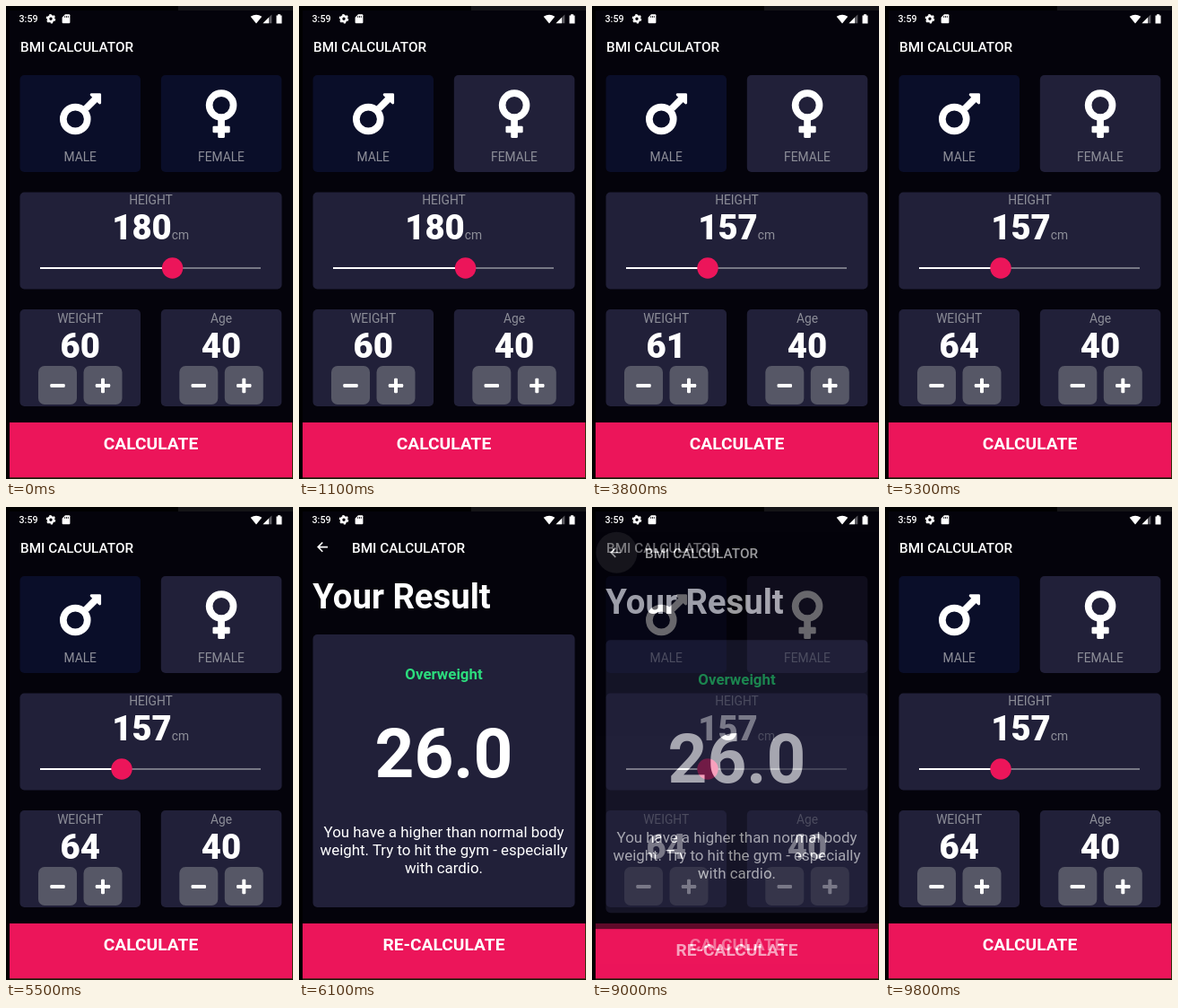
An HTML page that plays this animation: 320x527 px, repeating every 9900 ms.

```html
<!DOCTYPE html>
<html lang="en">
<head>
<meta charset="utf-8">
<title>BMI calculator</title>
<style>
  html, body { margin: 0; width: 100%; height: 100%; overflow: hidden; background: #000; }
  svg { display: block; width: 320px; height: 527px; font-family: Roboto, sans-serif; }
</style>
</head>
<body>
<svg id="stage" viewBox="0 0 320 527">
  <defs>
    <clipPath id="screen"><rect x="4" width="315" height="525.5"/></clipPath>
    <g id="minus"><rect x="-8.2" y="-2" width="16.4" height="4" rx="1.2"/></g>
    <g id="plus"><use href="#minus"/><rect x="-2" y="-8.2" width="4" height="16.4" rx="1.2"/></g>
  </defs>
  <rect width="320" height="527"/>
  <rect x="192" width="128" height="5" fill="#141417"/>
  <rect x="4" y="5" width="316" height="521.5" fill="#04030b"/>
  <g clip-path="url(#screen)">
    <g id="home"></g>
    <g id="result"></g>
  </g>
  <path d="M4 526H319.5V464" fill="none" stroke="#33300c"/>
  <g id="status" fill="#fff">
    <text x="14.5" y="18.3" font-size="10.7" font-weight="500">3:59</text>
    <circle cx="50" cy="14.3" r="3" fill="none" stroke="#fff" stroke-width="2.6"/>
    <circle cx="50" cy="14.3" r="4.6" fill="none" stroke="#fff" stroke-width="1.4" stroke-dasharray="2.4 2.417"/>
    <path d="M66 9.3h4.4q1 0 1 1v8q0 1-1 1h-6.8q-1 0-1-1v-5.600z"/>
    <path d="M65.700 11v2M67.500 11v2M69.300 11v2" stroke="#04030b" stroke-width=".8"/>
    <path d="M272.700 11.800Q279 7.600 285.300 11.800L279 19.500z"/>
    <path d="M296.300 9.500V19.300H286.500z" opacity=".35"/>
    <path d="M293 12.800V19.300H286.500z"/>
    <path d="M303 9.200h3v1.200h1.500v9h-6v-9h1.500z"/>
  </g>
</svg>
<script>
const LOOP = 9900, STEP = 100;
const PINK = '#ec155a', CARD = '#212039', DARK = '#0a0e29', GREY = '#8d8e98', PAGE = '#04030b';
const MID = 161.5;
const $ = id => document.getElementById(id);

function add(parent, tag, attrs, content) {
  const el = document.createElementNS('http://www.w3.org/2000/svg', tag);
  for (const k in attrs) el.setAttribute(k, attrs[k]);
  if (content) el.textContent = content;
  return parent.appendChild(el);
}
const rect = (p, x, y, width, height, fill, rx = 0) =>
  add(p, 'rect', { x, y, width, height, fill, rx });
const label = (p, str, x, y, size, weight = 400, fill = '#fff', anchor = 'middle') =>
  add(p, 'text', { x, y, 'font-size': size, 'font-weight': weight, fill, 'text-anchor': anchor }, str);

function bottomBar(p, str) {
  rect(p, 4, 464, 316, 63, PINK);
  label(p, str, MID, 494.3, 19.2, 700);
}

function counter(p, x, name, value) {
  rect(p, x, 338, 134.5, 108, CARD, 5);
  label(p, name, x + 67.2, 353.3, 13.8, 400, GREY);
  const num = label(p, value, x + 67.2, 391.7, 38.3, 900);
  [['minus', 42], ['plus', 92.5]].forEach(([icon, dx]) => {
    rect(p, x + dx - 21.5, 401, 43, 43, '#565766', 7);
    add(p, 'use', { href: '#' + icon, x: x + dx, y: 423, fill: '#fff' });
  });
  return num;
}

function buildHome(p) {
  label(p, 'BMI CALCULATOR', 16, 50.5, 15.3, 500, '#fff', 'start');
  rect(p, 15.5, 77, 134.5, 108, DARK, 5);
  const female = rect(p, 172.8, 77, 134.5, 108, DARK, 5);
  label(p, 'MALE', 82.7, 172.8, 13.8, 400, GREY);
  label(p, 'FEMALE', 240, 172.8, 13.8, 400, GREY);

  const glyph = x => add(p, 'g', {
    transform: `translate(${x} 89.5) scale(.12)`, fill: '#fff', stroke: '#fff', 'stroke-width': 0
  });
  const ring = (g, cy) => add(g, 'circle', { cx: 144, cy, r: 112, fill: 'none', 'stroke-width': 64 });
  const mars = glyph(60), venus = glyph(222.8);
  ring(mars, 304);
  add(mars, 'path', { d: 'M243 205L330 118', 'stroke-width': 64 });
  add(mars, 'path', { d: 'M372 64H293c-11 0-16 13-8.500 20.400l79 79c7.600 7.600 20.400 2.200 20.400-8.500V76q0-12-12-12z' });
  ring(venus, 176);
  rect(venus, 112, 300, 64, 180, '#fff', 12);
  rect(venus, 64, 368, 160, 64, '#fff', 12);

  rect(p, 15.5, 207.5, 292, 108, CARD, 5);
  label(p, 'HEIGHT', MID, 221.2, 13.8, 400, GREY);
  const height = label(p, '180', 118.2, 260, 38.3, 900, '#fff', 'start');
  label(p, 'cm', 184.8, 260, 13.8, 400, GREY, 'start');
  rect(p, 38, 291.2, 246, 1.6, GREY);
  const track = rect(p, 38, 291, 0, 2, '#fff');
  const halo = add(p, 'circle', { cy: 292, fill: PINK, opacity: .16 });
  const thumb = add(p, 'circle', { cy: 292, r: 11.7, fill: PINK });

  const weight = counter(p, 15.5, 'WEIGHT', '60');
  counter(p, 172.8, 'Age', '40');
  bottomBar(p, 'CALCULATE');
  return { female, height, track, halo, thumb, weight };
}

function buildResult(p) {
  rect(p, 4, 22, 316, 505, PAGE);
  const ripple = add(p, 'circle', { cx: 27.5, cy: 44.5, r: 23, fill: '#fff', opacity: 0 });
  add(p, 'path', {
    d: 'M32 44.600H21.500M26.300 39.500L21.200 44.600L26.300 49.700',
    fill: 'none', stroke: '#fff', 'stroke-width': 1.6
  });
  label(p, 'BMI CALCULATOR', 59, 50.5, 15.3, 500, '#fff', 'start');
  label(p, 'Your Result', 15.3, 112.7, 38.3, 700, '#fff', 'start');
  rect(p, 15.5, 142, 292, 304, CARD, 5);
  label(p, 'Overweight', MID, 192, 16.9, 700, '#2cdc7d');
  label(p, '26.0', MID, 301.3, 76.6, 700);
  ['You have a higher than normal body',
   'weight. Try to hit the gym - especially',
   'with cardio.'].forEach((s, i) => label(p, s, MID, 368 + i * 19.8, 16.9));
  bottomBar(p, 'RE-CALCULATE');
  return { ripple };
}

const home = buildHome($('home'));
const result = buildResult($('result'));

const clamp = v => Math.max(0, Math.min(1, v));
const ramp = (t, from, to) => clamp((t - from) / (to - from));

function bezier(x1, y1, x2, y2) {
  const at = (a, b, u) => 3 * a * u * (1 - u) ** 2 + 3 * b * u * u * (1 - u) + u ** 3;
  return x => {
    let lo = 0, hi = 1;
    for (let i = 0; i < 24; i++) {
      const m = (lo + hi) / 2;
      if (at(x1, x2, m) < x) lo = m; else hi = m;
    }
    return at(y1, y2, lo);
  };
}
const fade = bezier(.42, 0, 1, 1);
const slide = bezier(.4, 0, .2, 1);

const SELECT = 1000;
const DRAG = [1700, 3100];
const TAPS = [3700, 4000, 4300, 4600];
const PUSH = 5600, POP = 8920, TRANSITION = 300;

function render(t) {
  home.female.setAttribute('fill', t < SELECT ? DARK : CARD);

  const d = ramp(t, 1800, 2900);
  const cm = Math.round(180 - 23 * (1 - (1 - d) ** 1.5));
  const x = 38 + 2.46 * (cm - 120);
  home.height.textContent = cm;
  home.track.setAttribute('width', x - 38);
  home.thumb.setAttribute('cx', x);
  home.halo.setAttribute('cx', x);
  home.halo.setAttribute('r', 23 * Math.min(ramp(t, DRAG[0], DRAG[0] + 100), 1 - ramp(t, DRAG[1] - 100, DRAG[1])));

  home.weight.textContent = 60 + TAPS.filter(at => t >= at).length;

  const shown = ramp(t, PUSH, PUSH + TRANSITION) - ramp(t, POP, POP + TRANSITION);
  const page = $('result');
  page.setAttribute('opacity', fade(shown));
  page.setAttribute('visibility', shown > 0 ? 'visible' : 'hidden');
  page.setAttribute('transform', `translate(0 ${131 * (1 - slide(shown))})`);
  result.ripple.setAttribute('opacity', .12 * ramp(t, 8700, 8900));
}

const start = performance.now();
function tick() {
  const t = (performance.now() - start) % LOOP;
  render(Math.floor(t / STEP) * STEP);
  requestAnimationFrame(tick);
}
tick();
</script>
</body>
</html>
```
